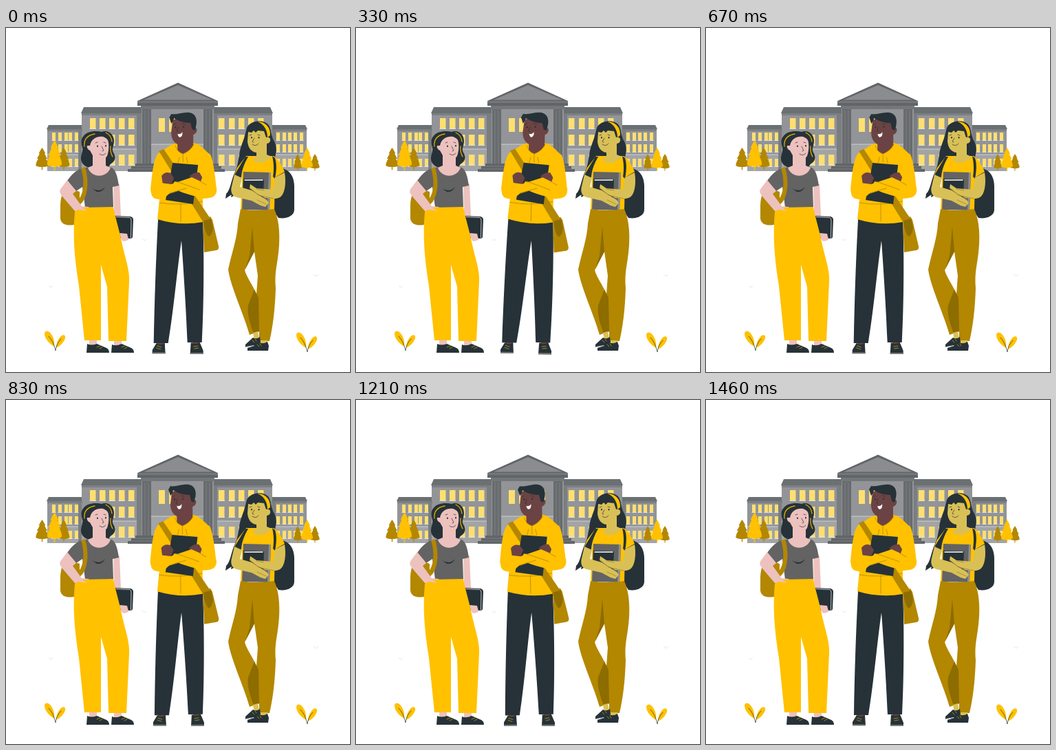
An HTML page that plays this animation: 500 px wide and 500 px high, repeating every 1.5 s.

```html
<!DOCTYPE html>
<html lang="en">
<head>
<meta charset="utf-8">
<title>Students</title>
<style>
  html, body { margin: 0; width: 100%; height: 100%; overflow: hidden; background: #fff; }
  svg { display: block; width: 100vw; height: 100vh; stroke-width: .7; }
  .y { fill: #ffc100; }
  .o { fill: #b38700; }
  .d { fill: #263238; }
  .p { fill: #edc1be; }
  .b { fill: #6c4344; }
  .s { fill: #d9c056; }
  .g { fill: #636363; }
  .w { fill: #fff; }
  .l { fill: none; stroke: #263238; stroke-linecap: round; stroke-linejoin: round; }
  .seam { stroke: #a67e00; }
  .gold { stroke: #e0ab00; }
  .white { stroke: #fff; }
  .crease { stroke: #957b32; }
</style>
</head>
<body>
<svg viewBox="0 0 500 500">
  <defs>
    <path id="tree" d="M0 0C3 4 5 8 7 12L5 12C8 17 9 20 11 23L8 23C11 28 13 32 13 37C9 40 4 40 1 40V46H-1V40C-4 40-9 40-13 37C-13 32-11 28-8 23L-11 23C-9 20-8 17-5 12L-7 12C-5 8-3 4 0 0"/>
    <g id="sprout">
      <path class="y" d="M70 463C62 458 56 451 56 444C57 439 62 440 65 444C69 449 71 456 70 463M73 465C73 457 77 450 81 447C84 445 87 447 86 451C84 457 79 462 73 465"/>
      <path class="l" d="M62 448Q69 455 72 469Q73 459 80 452"/>
    </g>
    <g id="wing">
      <path fill="#929497" d="M60 147H111V208H60zM110 124H198V208H110z"/>
      <path fill="#a2a4a6" d="M60 184H110V208H60zM110 176H190V208H110z"/>
      <path fill="#7d7f82" d="M60 147H111V150H60zM110 124H198V127H110z"/>
      <path fill="#6b7072" d="M62 141H110V147H59zM113 115H198V124H109z"/>
      <path fill="none" stroke="#e3e4e5" d="M60 184H110M110 176H198"/>
      <path fill="#7b7e81" d="M105 147H110V208H105zM190 124H198V208H190z"/>
    </g>
  </defs>

  <g id="building">
    <use href="#wing"/>
    <use href="#wing" transform="matrix(-1 0 0 1 497 0)"/>
    <g id="windows"></g>
    <path fill="#929497" d="M197 114H302V208H197z"/>
    <path fill="#a2a4a6" d="M211 169H287V208H211z"/>
    <path fill="#626568" d="M250 79.500L308 106V113H191V106z"/>
    <path fill="#8a8c8f" d="M250 83L300 104.500H200z"/>
    <path fill="#74777a" d="M191 106H308V109H191zM196 113H303V118H196z"/>
    <path fill="#696c6f" d="M198 118H211V200H198zM287 118H300V200H287z"/>
    <path fill="none" stroke="#85888b" d="M202 120V198M207 120V198M291 120V198M296 120V198"/>
    <path fill="none" stroke="#e3e4e5" d="M211 169H287"/>
    <path fill="#626568" d="M188 197H217V209H177V205H182V201H188zM282 197H309V201H313V205H318V209H282z"/>
    <path fill="none" stroke="#85888b" d="M188 201H217M183 205H217M282 201H309M282 205H313"/>
    <path fill="#ffdf70" d="M222 131H231V151H222zM237 131H246V151H237zM266 131H275V151H266z"/>
  </g>

  <g class="o">
    <use href="#tree" transform="translate(52.500 174) scale(.7)"/>
    <use href="#tree" transform="translate(84 174) scale(.65 .7)"/>
    <use href="#tree" transform="translate(424 183) scale(.46 .53)"/>
    <use href="#tree" transform="translate(449 183) scale(.52 .53)"/>
    <use class="y" href="#tree" transform="translate(70.500 163) scale(.82 .96)"/>
    <use class="y" href="#tree" transform="translate(437.500 174) scale(.65 .73)"/>
  </g>
  <use href="#sprout"/>
  <use href="#sprout" transform="translate(366 2)"/>
  <path fill="none" stroke="#ddd" d="M62 375l3 2 3-2M198 306l3 3 3-2M447 358l4 3 3-3"/>

  <g id="left-student">
    <path class="o" d="M93 233C82 235 79 246 79 260V277C80 285 88 288 99 286L107 284V238z"/>
    <path class="d" d="M112 158C117 150 130 149 139 151C149 147 157 155 157 164C157 172 153 175 156 181C161 188 158 194 153 197C149 200 151 203 144 203H124C116 203 108 197 109 188C110 180 113 178 110 170C109 164 110 160 112 158"/>
    <path class="p" d="M156 224L165 227L167 274L177 301L178 308L170 310L165 303L157 270z"/>
    <path class="d" d="M158 273L181 274Q185 275 185 279L184 303Q184 306 181 306L165 305z"/>
    <path class="l white" d="M160 274.500L180 275.500Q182 276 182 280L181.500 305"/>
    <path class="p" d="M165 298L176 299L178 307L173 310L167 306z"/>
    <path class="g" d="M120 202L107 205C99 209 93 216 89 222L102 237L111 231L113 245L115 261H156L155 231L164 229C162 216 160 207 154 203L145 201z"/>
    <path class="p" d="M126 185V200L119 203C124 218 146 219 152 203L145 200V187z"/>
    <path class="p" d="M121 164C124 158 133 156 145 157C151 164 150 178 147 186C143 193 134 192 127 187L122 178C117 176 116 169 121 170z"/>
    <path class="d" d="M118 171C115 161 120 154 128 153L139 152C149 149 155 158 151 170C150 163 146 160 141 158C132 157 124 161 122 171z"/>
    <path class="l gold" stroke-width="1.300" d="M114 172C113 162 117 156 129 154M145 152Q153 156 154 165M152 172Q151 180 155 187"/>
    <g class="l">
      <path d="M130 167l3-1M142 166l3 1M139 172l3 6-2 1M136 183Q141 187 145 182"/>
      <path stroke-width="2" d="M133 171.500v.6M145 171v.6"/>
    </g>
    <path class="d" d="M125 233Q136 240 144 231Q140 239 132 238z"/>
    <path class="o" d="M109 204L115 202C120 219 120 240 112 252L102 263L99 256C114 246 115 223 109 204"/>
    <path class="p" d="M89 221L102 237L97 241L110 259L120 260L123 264L114 267L105 269L100 266L82 245C78 240 77 237 80 233z"/>
    <path class="y" d="M111 261L156 260C158 273 164 290 169 315C174 337 180 353 179 369L175 455H149L147 376L138 344V454H114L106 375C99 333 97 300 100 267L105 264L118 266z"/>
    <path class="p" d="M121 454H132V462H121zM157 455H168V463H157z"/>
    <path class="d" d="M118 459Q124 462 132 459L146 465Q150 467 150 472H117zM154 460Q160 463 168 459L182 465Q186 467 186 472H153z"/>
    <path class="l gold" d="M132 464l5-2M136 466l4-2M168 464l5-2M172 466l4-2"/>
  </g>

  <g id="right-student">
    <path class="d" d="M392 204C407 202 418 210 419 229V264C419 273 408 278 396 276L387 263z"/>
    <path class="d" d="M350 145C355 134 373 132 381 140C386 146 385 158 390 165C395 175 393 187 386 194L356 205L333 213L328 242L319 248L320 241C326 236 327 222 332 211C337 201 337 195 339 185C340 173 346 163 348 153z"/>
    <path class="y" d="M349 186L336 203L332 213L343 218L341 264H390L391 217L405 209C401 199 396 191 389 186z"/>
    <path class="s" d="M364 173V187L358 190C362 199 378 198 386 187L379 184V167z"/>
    <path class="s" d="M352 151C357 146 371 145 378 151L379 159C386 157 386 168 379 168C376 175 371 181 364 181C356 180 352 174 351 165z"/>
    <path class="d" d="M349 154C351 142 359 137 369 138C378 139 383 146 382 157L378 159L375 150L366 149L363 152L360 149L357 152L352 151z"/>
    <path class="y" d="M366 136C377 136 385 145 384 156L380 159C380 149 376 141 366 136"/>
    <g class="l">
      <path d="M354 156l3-1M366 155l3 1M361 160l-3 5 2 1M358 169Q363 173 367 168"/>
      <path stroke-width="2" d="M357 159v.6M367.500 159v.6"/>
    </g>
    <path class="d" d="M348 187L352 187C347 196 343 205 342 216L331 244L327 246L333 212z"/>
    <path class="d" d="M387 186L391 189C394 198 393 209 391 219L388 216C390 205 389 195 387 186"/>
    <path class="g" d="M345 209L385 210L383 265L343 264z"/>
    <path fill="#8d8f91" d="M382 210H385L383 265H380z"/>
    <path class="d" d="M345 219L375 220L374 247L344 246z"/>
    <path class="l white" stroke-width="1.500" d="M347 221H373"/>
    <path class="s" d="M332 213L343 218L340 231L357 236L379 250L382 254L377 260L370 258L357 251L335 246C328 244 326 237 328 230z"/>
    <path class="s" d="M391 217L405 210C407 222 406 235 402 242C397 250 389 248 377 247L365 241L354 233L355 227L364 233L388 235z"/>
    <path class="l crease" d="M354 232L367 243L389 248M364 234L375 236M365 250L378 256"/>
    <path class="o" d="M341 263Q365 267 390 263C397 279 398 299 397 315C395 345 390 352 392 378C391 409 388 433 383 455H368L368 441L354 446C346 417 326 375 323 351C328 327 336 306 337 284zM361 325L347 352C350 363 359 374 364 387L366 360z"/>
    <path fill="#8d6c00" d="M361 325L358 289L354 331L348 350zM361 380L352 403C350 416 355 430 360 444L368 441L367 392z"/>
    <path class="s" d="M359 443L366 441L368 451L361 454zM369 454H380V460H369z"/>
    <path class="d" d="M359 450Q364 453 369 449L370 457L361 462L348 464V460zM368 457Q374 460 380 456L382 462L381 469H351V465L361 462z"/>
    <path class="l gold" d="M358 454l3 3M362 452l2 3M365 460l3 3M369 459l2 3"/>
    <path class="l white" d="M349 463.500L360 461.500"/>
  </g>

  <g id="middle-student">
    <path class="b" d="M220 453H231V463H220zM271 453H282V463H271z"/>
    <path class="d" d="M219 458Q224 462 231 458L232 473H213V468zM269 457Q275 461 282 457L287 469V474H268z"/>
    <path fill="#77797c" d="M213 471.500H232V473.500H213zM268 472H287V474H268z"/>
    <path class="l gold" d="M220 462l6 2M219 465l6 2M273 463l6-1M274 466l6-1"/>
    <path class="d" d="M221 278H286C288 322 288 400 285 457H264C262 409 258 348 255 309C249 350 244 410 236 458H215C216 397 218 336 221 278"/>
    <path class="y" d="M245 168C235 171 231 177 221 182C214 190 212 214 210 235C211 244 216 248 223 249L220 278Q253 288 286 282L286 248C297 248 306 243 306 236C304 218 302 195 297 184C289 179 285 170 273 167z"/>
    <path class="b" d="M249 161V178Q258 189 272 177V154z"/>
    <path class="b" d="M242 134C250 129 267 131 271 139L272 145C279 142 279 153 272 155C270 165 261 171 252 170C244 168 239 160 240 150z"/>
    <path class="d" d="M237 130L240 125C248 127 261 120 270 124C278 128 278 138 274 149L270 147L268 138C258 138 250 135 244 131C243 135 241 138 240 139z"/>
    <path class="w" d="M249 154Q254 155 256 151Q257 158 252 159Q250 158 249 154"/>
    <g class="l">
      <path d="M243 141l3-2M256 139l4 1M250 144l-2 6 2 1"/>
      <path stroke-width="2" d="M246 144v.6M258 143.500v.6"/>
    </g>
    <path class="y" d="M245 169C246 177 251 181 257 183C264 180 270 175 273 168C284 171 292 180 289 186C280 194 267 195 256 188C247 194 237 190 233 181z"/>
    <path class="l seam" d="M246 171Q248 179 257 183Q268 179 273 169M257 184V195M252 188L250 196M262 188L264 196M254 255V281M223 254Q252 259 285 252"/>
    <path class="o" d="M222 179L229 176L297 277L287 283z"/>
    <path class="o" d="M286 279L297 274L300 279L309 317Q310 322 306 323L288 326z"/>
    <path fill="#8f6e00" d="M287 280L298 277L301 290Q300 300 295 303Q289 300 287 280"/>
    <path class="d" d="M242 196L279 199L272 256L232 250z"/>
    <path class="b" d="M226 215Q231 208 239 211L244 218L240 228L228 229zM267 215Q273 209 281 210L285 217L282 226L268 223z"/>
    <path class="y" d="M211 232L224 225L240 227L270 217L283 223L278 228L237 241C230 248 223 250 217 248C212 246 211 242 211 239z"/>
    <path class="y" d="M245 223L266 229L282 224L297 227L306 232C307 243 302 248 289 247C271 245 253 238 239 232z"/>
    <path class="l seam" d="M247 223L267 230L281 235M284 224L291 228M238 240L262 233"/>
  </g>
</svg>
<script>
const QUARTER = 375, PERIOD = 1500, OFFSET = 40;
const student = document.getElementById("middle-student");

// Window groups: left edges, tops, width, height
const groups = [
  [[122, 136, 150, 164, 178, 309, 324, 338, 352, 366], [131, 155, 184], 8.5, 15],
  [[67, 76, 85, 91, 100, 393, 402, 410, 418, 427], [152, 169, 190], 5, 11],
];
const pane = (x, y, w, h) =>
  `<path fill="#ffdf70" d="M${x} ${y}h${w}v${h}h-${w}z"/>
   <path fill="#e3e4e5" d="M${x - .5} ${y + h}h${w + 1}v1h-${w + 1}z"/>`;
document.getElementById("windows").innerHTML = groups.map(([xs, ys, w, h]) =>
  ys.map(y => xs.map(x => pane(x, y, w, h)).join("")).join("")).join("");

// Linear sway: 0 -> 1 -> -1 -> 0 degrees
function swayAngle(time) {
  const t = (time + OFFSET) % PERIOD;
  if (t < QUARTER) return t / QUARTER;
  if (t < PERIOD - QUARTER) return 2 - t / QUARTER;
  return t / QUARTER - 4;
}

const start = performance.now();
function draw() {
  student.setAttribute("transform", `rotate(${swayAngle(performance.now() - start)} 259 298)`);
  requestAnimationFrame(draw);
}
draw();
</script>
</body>
</html>
```
